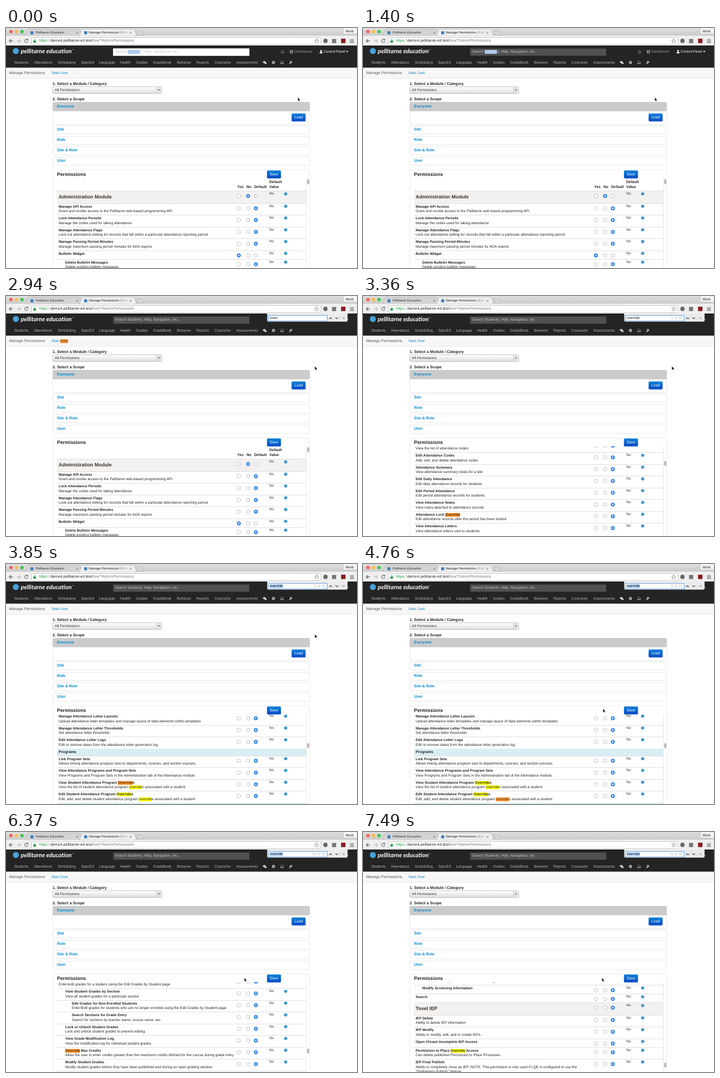
These frames come from a looping animation (640 px wide and 438 px high, 8 s). An HTML page:

```html
<!DOCTYPE html>
<html lang="en">
<head>
<meta charset="utf-8">
<title>Manage Permissions</title>
<style>
html, body { margin: 0; width: 100%; height: 100%; overflow: hidden; background: #fff; }
#stage { position: relative; width: 640px; height: 438px; overflow: hidden;
  font-family: "Liberation Sans", Arial, sans-serif; text-rendering: geometricPrecision; }
.layer { position: absolute; left: 0; top: 0; width: 640px; height: 438px; }
.t { position: absolute; line-height: 9px; white-space: pre; }
.b { position: absolute; box-sizing: border-box; }
mark { background: #ff0; color: #333; }
mark.on { background: #ff9632; color: #5c3a12; }
#list { clip-path: inset(274px 0 0 0); }
#thumb { left: 548.5px; width: 4px; height: 9px; border-radius: 2px; background: #b9b9b9; }
</style>
</head>
<body>
<div id="stage">
  <svg id="base" class="layer" viewBox="0 0 640 438">
    <defs>
      <linearGradient id="strip" x2="0" y2="1"><stop stop-color="#dedede"/><stop offset="1" stop-color="#cbcbcb"/></linearGradient>
      <linearGradient id="blue" x2="0" y2="1"><stop stop-color="#0b82d6"/><stop offset="1" stop-color="#0549c6"/></linearGradient>
      <linearGradient id="grey" x2="0" y2="1"><stop stop-color="#fff"/><stop offset="1" stop-color="#ddd"/></linearGradient>
    </defs>
  </svg>
  <div id="search" class="layer"></div>
  <div id="page" class="layer"></div>
  <div id="list" class="layer"></div>
  <div id="thumb" class="b"></div>
  <div id="find" class="layer"></div>
  <svg id="cursor" class="layer" viewBox="0 0 640 438">
    <path d="M0 0V7L1.6 5.6 2.7 8.1 3.8 7.6 2.8 5.2H5Z" fill="#000" stroke="#fff" stroke-width=".6"/>
  </svg>
</div>
<script>
const LOOP = 8000, STEP = 70;
const $ = id => document.getElementById(id);

// Row prefixes: digit = picked radio, ! column heads, # module, = group, > indent
const VIEWS = {
  home: { top: 274, thumb: 276, rows: [
    '!', '1#Administration Module',
    'Manage API Access|Grant and revoke access to the Pellitarne web-based programming API',
    'Lock Attendance Periods|Manage the codes used for taking attendance',
    'Manage Attendance Flags|Lock out attendance editing for records that fall within a particular attendance reporting period',
    'Manage Passing Period Minutes|Manage maximum passing period minutes for ADA reports',
    '0Bulletin Widget',
    '>Delete Bulletin Messages|Delete existing bulletin messages'] },
  codes: { top: 263.5, thumb: 301, rows: [
    'View Attendance Codes|View the list of attendance codes',
    'Edit Attendance Codes|Add, edit, and delete attendance codes',
    'Attendance Summary|View attendance summary totals for a site',
    'Edit Daily Attendance|Edit daily attendance records for students',
    'Edit Period Attendance|Edit period attendance records for students',
    'View Attendance Notes|View notes attached to attendance records',
    'Attendance Lock Override|Edit attendance records after the period has been locked',
    'View Attendance Letters|View attendance letters sent to students'] },
  programs: { top: 272, thumb: 327, rows: [
    'Manage Attendance Letter Layouts|Upload attendance letter templates and manage layout of data elements within templates',
    'Manage Attendance Letter Thresholds|Set attendance letter thresholds',
    'Edit Attendance Letter Logs|Edit or remove dates from the attendance letter generation log',
    '=Programs',
    'Link Program Sets|Allows linking attendance program sets to departments, courses, and section-courses.',
    'View Attendance Programs and Program Sets|View Programs and Program Sets in the Administration tab of the Attendance module.',
    'View Student Attendance Program Overrides|View the list of student attendance program overrides associated with a student',
    'Edit Student Attendance Program Overrides|Edit, add, and delete student attendance program overrides associated with a student',
    '=Reports'] },
  plans: { top: 263.5, thumb: 360, rows: [
    'View Plans|View plans for students at a site',
    'Create Plans|Create new plans for students',
    'Delete Plans|Delete unpublished plans',
    'Publish Plans|Publish plans for students',
    'Re-open Closed Plans|Re-open a plan that was closed incomplete',
    'View Plan Reports|View reports on all plans at a site',
    'Plan Override Access|Edit plans after they have been published',
    'Print Plans|Print plans and progress reports'] },
  evaluation: { top: 263.5, thumb: 373, rows: [
    'View Initial Requests|View Initial Requests for Special Ed Evaluation',
    'MET Diagnostic Assurance Statment Configuration Access|Ability to add/edit/delete MET diagnostic assurance statements',
    'Delete METs|Delete METs', 'Create/Edit METs|Create and modify METs', 'View METs|View METs',
    'Re-open Closed Incompete Evaluation|Re-open a REED that was closed incomplete',
    'Evaluation Override Access', 'Publish Evaluations|Publish evaluations',
    'Delete Re-Evaluation Plans|Delete re-evaluation plans'] },
  sections: { top: 263.5, thumb: 385, rows: [
    'View Sections|View all sections for a particular site',
    'Edit Sections|Edit the details of existing sections',
    '>Add Students to Sections|Add students to an existing section',
    '>Remove Students from Sections|Remove students from an existing section',
    '>View Section Attendance|View attendance for a particular section',
    '>Edit Section Attendance|Edit attendance for a particular section',
    '>Attendance Override Access|Edit section attendance after the period has closed',
    'View Rosters|View section rosters for a particular site'] },
  grades: { top: 263.5, thumb: 395, rows: [
    'Edit Student Grades|Enter/edit grades for a student using the Edit Grades by Student page',
    '>View Student Grades by Section|View all student grades for a particular section',
    '>>Edit Grades for Non-Enrolled Students|Enter/Edit grades for students who are no longer enrolled using the Edit Grades by Student page',
    '>>Search Sections for Grade Entry|Search for sections by teacher name, course name, etc.',
    '>Lock or Unlock Student Grades|Lock and unlock student grades to prevent editing',
    '>View Grade Modification Log|View the modification log for individual student grades',
    '>Override Max Credits|Allow the user to enter credits greater than the maximum credits defined for the course during grade entry',
    '>Modify Student Grades|Modify student grades before they have been published and during an open grading window',
    'View Transcripts|View student transcripts'] },
  windows: { top: 263.5, thumb: 408, rows: [
    'Manage Grading Windows|Open and close grading windows for a site',
    '>View Grading Windows|View the list of grading windows',
    '>Edit Grading Windows|Edit the dates of existing grading windows',
    '>Delete Grading Windows|Delete grading windows that are not in use',
    '>View Grading Periods|View grading periods for a particular site',
    '>Edit Grading Periods|Edit grading periods for a particular site',
    '>Override Grading Window|Allow the user to override the dates of a closed grading window',
    '>Publish Student Grades|Publish grades at the end of a grading window'] },
  plansPublish: { top: 257.5, thumb: 421, rows: [
    '>Delete Screening Information|Grants user ability to delete Health Screening',
    '>Modify Screening Information', 'Search', '#Tovel IEP',
    'IEP Delete|Ability to delete IEP information',
    'IEP Modify|Ability to modify, edit, and or create IEPs',
    'Open Closed Incomplete IEP Access',
    'Permisison to Place Override Access|Can delete published Permission to Place Processes',
    'IEP Final Publish|Ability to completely close an IEP. NOTE: This permission is only used if LQE is configured to use the|"Preliminary Publish" feature'] }
};

// time, view, highlighted query, current match, field text, field selected, counter
const STATES = [
  [0, 'home', '', -1, '', 0, ''],
  [1960, 'home', '', -1, 'student', 1, '1 of 315'],
  [2170, 'home', 'o', 0, 'o', 0, '1 of 1306'],
  [2310, 'home', 'ov', 0, 'ov', 0, '1 of 46'],
  [2380, 'home', 'ove', 0, 'ove', 0, '1 of 44'],
  [2450, 'home', 'over', 0, 'over', 0, '1 of 31'],
  [2940, 'home', 'over', 0, 'overr', 0, ''],
  [3010, 'home', '', -1, 'overri', 0, ''],
  [3150, 'home', '', -1, 'overrid', 0, ''],
  [3220, 'home', '', -1, 'override', 0, ''],
  ...[[3360, 'codes', 0], [3850, 'programs', 0], [4130, 'programs', 1], [4480, 'programs', 2],
    [4760, 'programs', 3], [4970, 'plans', 0], [5180, 'evaluation', 0], [5460, 'sections', 0],
    [5950, 'sections', -1], [6160, 'sections', -1], [6370, 'grades', 0], [6580, 'windows', 0],
    [6860, 'windows', 1], [7280, 'plansPublish', 0], [7490, 'plansPublish', -1]
  ].map(([at, view, on], i) => [at, view, 'override', on, 'override', i > 0, `${i + 1} of 18`])
];

// time, x, y of the pointer tip
const PATH = [[0, 532, 126.5], [1890, 532, 126.5], [1960, 563, 128], [4200, 563, 128], [4270, 562, 146],
  [4340, 558, 188], [4410, 558, 188], [4480, 532, 214], [4620, 466, 254], [4760, 437.5, 264],
  [5180, 437.5, 264], [5390, 434.5, 266], [6930, 434.5, 266], [7000, 435.5, 266], [LOOP, 435.5, 266]];

// y is the middle of the capitals; the baseline sits on a whole pixel
const txt = (x, y, s, size = 6.6, color = '#222', css = '') =>
  `<div class="t" style="left:${x}px;top:${Math.round(y + .35 * size + .3) - 7}px;font-size:${size}px;color:${color};${css}">${s}</div>`;
const bold = (x, y, s, size = 6.5, color = '#222') => txt(x, y, s, size, color, 'font-weight:700');
const box = (x, y, w, h, css) =>
  `<div class="b" style="left:${x}px;top:${y}px;width:${w}px;height:${h}px;${css}"></div>`;
const rect = (x, y, w, h, fill, stroke = 'none', r = 0) =>
  `<rect x="${x}" y="${y}" width="${w}" height="${h}" rx="${r}" fill="${fill}" stroke="${stroke}" stroke-width=".7"/>`;
const dot = (x, y, r, fill, stroke = 'none') =>
  `<circle cx="${x}" cy="${y}" r="${r}" fill="${fill}" stroke="${stroke}" stroke-width=".7"/>`;
const line = (d, stroke, w = 1) =>
  `<path d="${d}" fill="none" stroke="${stroke}" stroke-width="${w}" stroke-linecap="round" stroke-linejoin="round"/>`;
const cross = (x, y, r, color) => line(`M${x - r} ${y - r}L${x + r} ${y + r}M${x + r} ${y - r}L${x - r} ${y + r}`, color, .9);

function drawBase() {
  const tab = (x, w, fill) =>
    `<path d="M${x} 14L${x + 4} 3Q${x + 5} 2 ${x + 6} 2H${x + w - 6}Q${x + w - 5} 2 ${x + w - 4} 3L${x + w} 14Z" fill="${fill}" stroke="#a9a9a9" stroke-width=".6"/>`;
  const wrench = (x, y) => line(`M${x - 2} ${y + 2.3}L${x + 1} ${y - .8}`, '#ccc', 1.5) + line(`M${x + 2.4} ${y - 1.6}A1.6 1.6 0 1 1 ${x + .8} ${y - 2.8}`, '#ccc', 1.1);
  const panel = (y, h) => rect(85.5, y + .5, 468, h, '#fff', '#ddd', 2);
  const button = (x, y) => rect(x, y, 25.6, 14.4, 'url(#blue)', 'none', 2);
  $('base').innerHTML += [
    // browser window
    rect(0, 0, 640, 14, 'url(#strip)'),
    dot(9, 6.5, 3.1, '#fc5b57'), dot(19, 6.5, 3.1, '#fdbe41'), dot(29.2, 6.5, 3.1, '#35c84b'),
    tab(36, 102, '#d4d4d4'), rect(0, 14, 640, 18, '#efefef'), tab(134, 104, '#efefef'),
    rect(136, 13.4, 100, 1.5, '#efefef'),
    `<path d="M238 5h9l4 8h-9z" fill="#d8d8d8" stroke="#a9a9a9" stroke-width=".6"/>`,
    rect(44.5, 6, 5.5, 5.5, '#3a7fc1'), rect(142.5, 6, 5.5, 5.5, '#3a7fc1'),
    cross(130, 8.7, 1.6, '#777'), cross(227, 8.7, 1.6, '#777'),
    rect(615, -2, 27, 13, '#f4f4f4', '#b5b5b5', 2),
    line('M12 23.5H6M8.8 20.6L6 23.5 8.8 26.4', '#6b6b6b', 1.3),
    line('M20.5 23.5H26.5M23.7 20.6L26.5 23.5 23.7 26.4', '#c0c0c0', 1.3),
    line('M39.4 21.5A3 3 0 1 0 40 24.4M39.8 19.8V22H37.6', '#6b6b6b', 1.1),
    rect(46.5, 17.5, 527.5, 12.5, '#fff', '#bbb', 2),
    rect(50, 23, 4.6, 3.7, '#1a9b3c', 'none', .5), line('M51 23V21.7A1.3 1.3 0 0 1 53.6 21.7V23', '#1a9b3c', .8),
    line('M566.5 19.6L567.6 22.2 570.4 22.5 568.3 24.3 569 27 566.5 25.5 564 27 564.7 24.3 562.6 22.5 565.4 22.2Z', '#777', .7),
    dot(582.5, 23.5, 3.9, '#666'), rect(594.5, 20, 7.5, 7.5, '#777'), rect(611, 19.5, 8, 8, '#8c1b1f'),
    line('M627.5 21H634M627.5 23.7H634M627.5 26.4H634', '#666', 1.2),
    // site header
    rect(0, 32, 640, 40.6, '#242424'), rect(0, 32, 640, .8, '#111'),
    dot(18, 42, 5.5, '#45a3d9'),
    `<path d="M501.4 45Q502.4 44 502.4 42.4A2 2 0 0 1 506.2 42.4Q506.2 44 507.2 45Z" fill="none" stroke="#999" stroke-width=".8"/>`,
    dot(504.3, 46.2, .8, '#999'),
    ...[517.5, 520.8].flatMap(x => [40.4, 43.6].map(y => rect(x, y, 2.6, 2.6, '#999'))),
    dot(574.5, 41.5, 1.6, '#fff'), `<path d="M571.7 46.2Q571.7 43.2 574.5 43.2T577.3 46.2ZM620 42h4.4l-2.2 2.4z" fill="#fff"/>`,
    `<ellipse cx="471" cy="62.3" rx="2.6" ry="2" fill="#ccc"/><ellipse cx="473.4" cy="64.2" rx="2" ry="1.5" fill="#ccc"/>`,
    `<circle cx="487.7" cy="63" r="1.7" fill="none" stroke="#ccc" stroke-width="1.4"/><circle cx="487.7" cy="63" r="2.7" fill="none" stroke="#ccc" stroke-width=".9" stroke-dasharray="1.06"/>`,
    line('M500.7 64.5V63A2.6 2.6 0 0 1 506 63V64.5', '#999', .8), rect(500.5, 63.8, 5.7, 1.8, '#999'), wrench(519, 63),
    // page
    rect(0, 72.6, 640, 19.4, '#f8f6f7'), rect(0, 91.6, 640, .7, '#e2e2e2'),
    rect(85.4, 107, 198.6, 12.6, 'url(#grey)', '#aaa', 2), rect(274.4, 107.4, 9.2, 11.8, '#e4e4e4', 'none', 1),
    rect(274.2, 107.2, .6, 12.2, '#aaa'), `<path d="M277.3 112h3.6l-1.8 2.8z" fill="#666"/>`,
    panel(135, 41), rect(85.5, 135.5, 468, 16, '#cbcbcb', '#c2c2c2', 2),
    ...[178, 197, 216, 235].map(y => panel(y, 15)),
    line('M85.5 438V261Q85.5 259 87.5 259H551.5Q553.5 259 553.5 261V438', '#e3e3e3', .7),
    button(520.7, 156), button(475.8, 260)
  ].join('');
}

function pageText(mark) {
  const nav = { Students: 15, Attendance: 51, Scheduling: 94.5, SpecEd: 137, Language: 169.5, Health: 208, Grades: 237,
    GradeBook: 268, Behavior: 311.5, Reports: 347, Counselor: 380, Assessments: 420 };
  const scopes = [['Everyone', 143], ['Site', 185.3], ['Role', 204.3], ['Site &amp; Role', 223.3], ['User', 242.3]];
  const link = '#0088cc';
  return [
    txt(83, 82, mark('Start Over'), 6.6, link),
    txt(54, 9.6, 'Pellitarne Education', 5.9, '#333'),
    txt(151, 9.6, 'Manage Permissions | Pellit', 5.9, '#222',
      'width:73px;overflow:hidden;-webkit-mask-image:linear-gradient(90deg,#000 75%,transparent)'),
    txt(619, 6.6, 'Work', 6.4, '#222'),
    txt(60, 23.6, '<span style="color:#1a9b3c">https</span><span style="color:#888">://</span>demo4.pellitarne-ed.test<span style="color:#777">/live/?AdminPermissions</span>', 7.05),
    txt(27, 41, 'pellitarne education<span style="font-size:4px;line-height:0;vertical-align:4px">™</span>', 11, '#fff',
      'font-family:Lato,sans-serif;font-weight:700;font-style:italic'),
    txt(526, 43.3, mark('Dashboard'), 6.6, '#999'), txt(579, 43.3, mark('Control Panel'), 6.5, '#fff'),
    ...Object.entries(nav).map(([s, x]) => txt(x, 63, mark(s), 6.6, '#bbb')),
    txt(6, 82.2, mark('Manage Permissions'), 7, '#555'),
    bold(85, 102, mark('1. Select a Module / Category'), 7.15), bold(85, 130, mark('2. Select a Scope'), 7.15),
    txt(89, 113.3, mark('All Permissions'), 6.6, '#333'),
    ...scopes.map(([s, y]) => bold(93, y, mark(s), 7.05, link)),
    txt(526, 163.2, mark('Load'), 6.9, '#fff'), txt(480.7, 267, mark('Save'), 6.9, '#fff'),
    bold(93, 267, mark('Permissions'), 8.9)
  ].join('');
}

function controls(y, picked) {
  const radio = (x, i) => i === picked
    ? dot(x, y + 9.6, 3.6, '#2f86f3') + dot(x, y + 9.6, 1.3, '#fff')
    : dot(x, y + 9.6, 3.4, '#fff', '#aaa');
  const info = dot(510, y + 5.7, 2.7, '#0a7dc2') +
    `<path d="M509.4 ${y + 5.2}h1v2.2M510 ${y + 3.9}v.5" stroke="#fff" stroke-width=".8" fill="none"/>`;
  return `<svg class="layer">${[424.5, 441.5, 455.5].map(radio).join('')}${info}</svg>` +
    txt(480, y + 5.6, 'No', 6.6, '#333');
}

function listRows(view, mark) {
  let y = view.top, html = box(546.5, 274, 1, 164, 'background:#e4e4e4');
  for (const row of view.rows) {
    const [, pick, kind, title, rest] = /^(\d?)([!#=>]*)([^|]*)\|?(.*)$/.exec(row);
    const picked = pick ? +pick : 2, x = 96 + (kind[0] === '>' ? 12 * kind.length : 0);
    if (kind === '!') {
      html += [['Yes', 421.5, 290], ['No', 438.5, 290], ['Default', 452.5, 290], ['Default', 480, 281], ['Value', 480, 290]]
        .map(([s, hx, hy]) => bold(hx, hy, s, 6.75)).join('');
      y += 23;
    } else if (kind === '=') {
      html += box(93, y, 454, 13.3, 'background:#d9edf7') + bold(96, y + 6.7, mark(title), 6.9);
      y += 13;
    } else if (kind === '#') {
      html += box(93, y, 454, 22.5, 'background:#f3f1ef;border-top:1px solid #e0e0e0') +
        bold(96, y + 11, mark(title), 8.95, '#3a3128') + controls(y, picked);
      y += 22.5;
    } else {
      const notes = rest ? rest.split('|') : [];
      html += box(93, y, 454, 1, 'background:#dedede') + bold(x, y + 6.5, mark(title)) +
        notes.map((s, i) => txt(x, y + 15 + 8.5 * i, mark(s), 6.58)).join('') + controls(y, picked);
      y += notes.length ? 13 + 8.5 * notes.length : 16;
    }
  }
  return html;
}

function findBar(text, selected, count) {
  if (!text) return '';
  return box(476, 32, 147, 15, 'background:#ececec;border:1px solid #bdbdbd;border-top:0;border-radius:0 0 3px 3px') +
    box(478, 35, 108, 11, 'background:#fff;border:1px solid #74a9e6;box-shadow:0 0 1px #74a9e6') +
    txt(480.5, 40.6, `<span style="background:${selected ? '#b3d5fd' : 'none'}">${text}</span>`, 6.7, '#111') +
    txt(530, 40.6, count, 6.6, '#b5b5b5', 'width:52px;text-align:right') +
    `<svg class="layer">${line('M589.6 41.5L591.8 39.3 594 41.5M600.9 39.3L603.1 41.5 605.3 39.3', '#555', 1.2)}${line('M597.5 36V45M609 36V45', '#d2d2d2', .6)}${cross(615.5, 40.2, 1.5, '#888')}</svg>`;
}

function drawSearch(t) {
  const k = Math.min(t / 280, 1), shade = Math.round(255 - 174 * k);
  const tint = t < 1960 ? '#a9cdf7' : t < 2170 ? '#8b8b8b' : 'none';
  $('search').innerHTML =
    box(195, 37, 249, 13.5, `background:rgb(${shade},${shade},${shade});border:1px solid ${k < 1 ? '#ddd' : '#3c3c3c'};border-radius:1px`) +
    txt(199, 43.6, `Search <span style="background:${tint}">Student</span>s, Help, Navigation, etc...`, 6.6, '#c4c4c4');
}

function showState([, name, query, current, text, selected, count]) {
  let seen = 0;
  const mark = s => query
    ? s.replace(new RegExp(query, 'gi'), m => `<mark${seen++ === current ? ' class="on"' : ''}>${m}</mark>`) : s;
  $('page').innerHTML = pageText(mark);
  $('list').innerHTML = listRows(VIEWS[name], mark);
  $('thumb').style.top = VIEWS[name].thumb + 'px';
  $('find').innerHTML = findBar(text, selected, count);
}

function pointerAt(t) {
  const i = PATH.findIndex(p => p[0] > t), [t0, x0, y0] = PATH[i - 1], [t1, x1, y1] = PATH[i];
  const k = (t - t0) / (t1 - t0);
  return [x0 + (x1 - x0) * k, y0 + (y1 - y0) * k];
}

let lastTime = -1, lastState = null;
function tick() {
  const t = Math.floor(performance.now() % LOOP / STEP) * STEP;
  if (t !== lastTime) {
    const state = STATES.findLast(s => s[0] <= t);
    if (state !== lastState) showState(lastState = state);
    drawSearch(t);
    const [x, y] = pointerAt(t);
    $('cursor').firstElementChild.setAttribute('transform', `translate(${x} ${y})`);
    lastTime = t;
  }
  requestAnimationFrame(tick);
}

drawBase();
tick();
</script>
</body>
</html>
```
